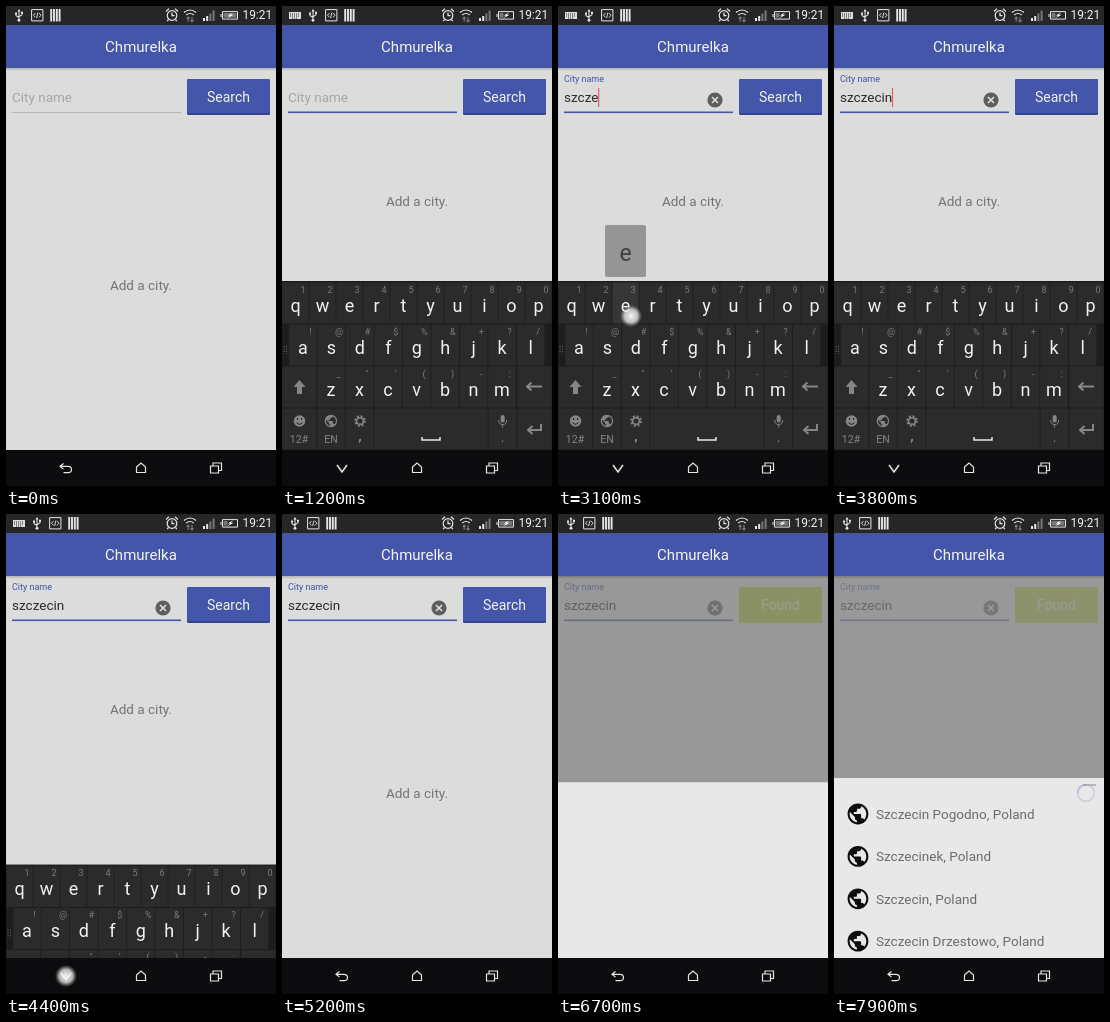
Recreate the animation shown at these times as an HTML page. Size 270 by 480 pixels, loop 8 s.

```html
<!DOCTYPE html>
<html lang="en">
<head>
<meta charset="utf-8">
<title>Weather search</title>
<style>
html, body { margin: 0; width: 100%; height: 100%; overflow: hidden; background: #000; }
svg { display: block; width: 100%; height: 100%; font-family: Roboto, "Open Sans", sans-serif; }
.mid { text-anchor: middle; }
.line { fill: none; stroke: #e6e6e6; stroke-width: 1.2; }
</style>
</head>
<body>
<svg viewBox="0 0 270 480" xmlns="http://www.w3.org/2000/svg">
  <defs>
    <path id="globe" d="M12 2C6.48 2 2 6.48 2 12s4.48 10 10 10 10-4.48 10-10S17.52 2 12 2zm-1 17.93c-3.95-.49-7-3.85-7-7.93 0-.62.08-1.21.21-1.79L9 15v1c0 1.1.9 2 2 2v1.93zm6.9-2.54c-.26-.81-1-1.39-1.9-1.39h-1v-3c0-.55-.45-1-1-1H8v-2h2c.55 0 1-.45 1-1V7h2c1.1 0 2-.9 2-2v-.41c2.93 1.19 5 4.06 5 7.41 0 2.08-.8 3.97-2.1 5.39z"/>
    <linearGradient id="shade" x1="0" y1="0" x2="0" y2="1">
      <stop offset="0" stop-color="#000" stop-opacity=".2"/>
      <stop offset="1" stop-color="#000" stop-opacity="0"/>
    </linearGradient>
    <radialGradient id="glow">
      <stop offset="0" stop-color="#fff" stop-opacity=".95"/>
      <stop offset=".6" stop-color="#eee" stop-opacity=".75"/>
      <stop offset=".8" stop-color="#ddd" stop-opacity=".35"/>
      <stop offset="1" stop-color="#ddd" stop-opacity="0"/>
    </radialGradient>
  </defs>

  <rect width="270" height="480" fill="#dcdcdc"/>

  <g id="content">
    <text id="hint" x="6" y="96" font-size="13.5" fill="#a6a6a6">City name</text>
    <text id="label" x="6" y="75.5" font-size="9" fill="#3f51a5">City name</text>
    <text x="6" y="96" font-size="13.5" fill="#2b2b2b" xml:space="preserve"><tspan id="typed"></tspan><tspan id="fresh" fill-opacity=".45"></tspan></text>
    <rect id="oldCaret" y="82" width="1.2" height="19" fill="#e85a70"/>
    <rect id="caret" y="82" width="1.2" height="19" fill="#e85a70"/>
    <rect id="rule" x="6" width="169"/>
    <g id="clear">
      <circle cx="157" cy="94" r="7.6" fill="#5e5e5e"/>
      <path d="M154 91l6 6m0-6l-6 6" stroke="#e4e4e4" stroke-width="1.5"/>
    </g>
    <text id="empty" class="mid" x="135" font-size="13.5" fill="#747474">Add a city.</text>
    <g id="search">
      <rect x="181" y="73" width="83" height="36" rx="1.5" fill="#34448f"/>
      <rect id="face" x="181" y="73" width="83" height="34" rx="1.5" fill="#4356aa"/>
      <text class="mid" x="222.5" y="96" font-size="14" fill="#f2f2f6">Search</text>
    </g>
    <g id="found">
      <rect x="181" y="73" width="83" height="36" rx="1" fill="#b2c63a"/>
      <text class="mid" x="222.5" y="96" font-size="14" fill="#eaf0cc">Found</text>
    </g>
  </g>

  <rect y="62" width="270" height="3" fill="url(#shade)"/>
  <rect id="dim" y="62" width="270" height="382"/>

  <g id="sheet">
    <rect y="264" width="270" height="182" fill="#e8e8e8"/>
    <g id="list"></g>
    <g id="spinner" fill="none">
      <circle cx="252" cy="279" r="8.3" stroke="#cbcbe0" stroke-width="1.6"/>
      <path id="arc" d="M252 270.7a8.3 8.3 0 0 1 8.3 8.3" stroke="#b4b8de" stroke-width="1.6"/>
      <path d="M249 271h13" stroke="#8a8a8a"/>
    </g>
  </g>

  <rect y="19" width="270" height="43" fill="#4356aa"/>
  <text class="mid" x="135" y="46" font-size="15" fill="#f4f4f8">Chmurelka</text>

  <rect width="270" height="19" fill="#262626"/>
  <g id="kbIcon" fill="#ddd">
    <path d="M7 6h12v7H7z"/>
    <path d="M8 8h10M8 10h10M10 12h6" stroke="#222" stroke-width="1" stroke-dasharray="1 1"/>
  </g>
  <g id="notes">
    <g transform="translate(13 9) scale(.85) translate(-13 -9)">
      <path class="line" d="M13 4v11M9.500 7.500v2.300l3.500 2.200M16.500 6.500v2.300l-3.500 2.200"/>
      <path d="M13 1.800l1.800 3h-3.600zM8.300 6h2.400v2.400H8.300zM15.300 5.200h2.400v2.400h-2.400z" fill="#e6e6e6"/>
      <circle cx="13" cy="15.300" r="1.700" fill="#e6e6e6"/>
    </g>
    <path class="line" d="M25.600 3.600h11.300v11.300H25.600z" style="stroke-width:1"/>
    <path class="line" d="M29.500 7l-2 2.200 2 2.200M33 7l2 2.200-2 2.200M31.900 6.500l-1.300 5.500" style="stroke-width:.9"/>
    <path d="M45.200 3v12.500M48 3v12.500M50.800 3v12.500M53.600 3v12.500" stroke="#e6e6e6" stroke-width="1.900"/>
  </g>
  <g class="line">
    <circle cx="166" cy="9.500" r="4.800"/>
    <path d="M166 6.500v3.200h2.500M160 5.500l3-2.700M172 5.500l-3-2.700M162.500 13.500l-1.300 1.500M169.500 13.500l1.300 1.500"/>
    <path d="M178 6.500q6-5 12 0M180.200 9q3.800-3 7.600 0"/>
  </g>
  <path id="arrows" d="M182.200 16v-5m-1.500 1.800l1.500-1.800 1.500 1.800M186 11v5m-1.500-1.800l1.500 1.800 1.500-1.800" fill="none" stroke="#eee" stroke-width="1.200"/>
  <path d="M197 12h2v3h-2zM200.200 10h2v5h-2z" fill="#e6e6e6"/>
  <path d="M203.400 7.500h2V15h-2zM206.600 4.500h2V15h-2z" fill="#777"/>
  <path class="line" d="M216.500 5.600h15v7.500h-15zM215 8v3" style="stroke-width:1"/>
  <rect id="charge" y="7" height="4.700" fill="#777"/>
  <path d="M227.500 6.300l-6 3.300h2.700l-3 2.800 6.300-3.600h-2.800z" fill="#fff"/>
  <text x="236.500" y="13.300" font-size="11.900" fill="#f2f2f2">19:21</text>

  <g id="board"></g>
  <g id="popup">
    <rect width="41" height="52" rx="2" fill="#858585" opacity=".82"/>
    <text id="popChar" class="mid" x="20.500" y="35.500" font-size="23" fill="#404040"></text>
  </g>

  <rect y="444" width="270" height="36" fill="#0c0b0e"/>
  <path id="back" class="line" d="M57.500 457.500l-3.500 2.800 3.500 2.800M54.500 460.300h7.500q3.500 0 3.500 3.200t-3.500 3.200h-4.500"/>
  <path id="down" class="line" d="M55 459l5 7 5-7" style="stroke-width:1.500"/>
  <path class="line" d="M130.500 466.500v-5.500l4.500-4 4.500 4v5.500z"/>
  <path class="line" d="M204.500 460h8v7h-8zM207 459.500v-2.500h8.500v7.500H213"/>
  <circle id="touch" r="11" fill="url(#glow)"/>
</svg>
<script>
const LOOP = 8000, STEP = 100;
const $ = id => document.getElementById(id);
const set = (id, attrs) => { for (const k in attrs) $(id).setAttribute(k, attrs[k]); };
const show = (id, on) => set(id, { opacity: on ? 1 : 0 });
const ramp = (t, a, b) => Math.min(1, Math.max(0, (t - a) / (b - a)));
const easeOut = p => 1 - (1 - p) ** 3;
const shift = (id, x, y) => set(id, { transform: `translate(${x} ${y})` });

// Keyboard
const keys = {};
const text = (x, y, size, fill, s) =>
  `<text class="mid" x="${x}" y="${y}" font-size="${size}" fill="${fill}">${s}</text>`;
const keyRect = (x, y, w, id = "") =>
  `<rect ${id && `id="key-${id}"`} x="${x + .4}" y="${y + .5}" width="${w - .8}" height="41" fill="#2b2b2b"/>`;

function letterRow(chars, subs, x0, pitch, y) {
  return [...chars].map((c, i) => {
    const cx = x0 + pitch * i;
    keys[c] = { x: cx, y };
    const sub = subs[i] === "&" ? "&amp;" : subs[i];
    return keyRect(cx - pitch / 2, y, pitch, c) +
      text(cx, y + 29.5, 18, "#f2f2f2", c) + text(cx + 7.5, y + 10.5, 9, "#7c7c7c", sub);
  }).join("");
}

function buildBoard() {
  const g = "#858585";
  $("board").innerHTML =
    `<rect y="275" width="270" height="170" fill="#1d1d1d"/>` +
    letterRow("qwertyuiop", "1234567890", 13.5, 27, 276) +
    letterRow("asdfghjkl", "!@#$%&+?/", 21, 28.45, 318) +
    letterRow("zxcvbnm", "_\"'()-:", 49, 28.5, 360) +
    keyRect(0, 360, 34.7) + keyRect(234.8, 360, 35.2) +
    keyRect(0, 402, 34.7) + keyRect(34.7, 402, 28.5) + keyRect(63.2, 402, 28.5) +
    keyRect(91.7, 402, 114.5) + keyRect(206.2, 402, 28.6) + keyRect(234.8, 402, 35.2) +
    `<path d="M2 340v8M4.500 340v8" stroke="#666" stroke-dasharray="1 1.5"/>
     <path d="M17.500 374l6 7h-3.500v7h-5v-7h-3.500z" fill="${g}"/>
     <path d="M260 380.500h-15m4.500-4l-4.500 4 4.500 4M259 418v6h-13m4.500-4l-4.500 4 4.500 4" fill="none" stroke="${g}" stroke-width="2"/>
     <circle cx="17.500" cy="415" r="5.800" fill="${g}"/>
     <path d="M14.500 416.500q3 3.500 6 0M15.500 412v2M19.500 412v2" fill="none" stroke="#222"/>
     <use href="#globe" fill="${g}" transform="translate(41.500 407.500) scale(.62)"/>
     <circle cx="78" cy="415" r="4.700" fill="none" stroke="${g}" stroke-width="2.200" stroke-dasharray="2 1.690"/>
     <circle cx="78" cy="415" r="3.300" fill="none" stroke="${g}" stroke-width="1.500"/>
     <path d="M140 431v3h18v-3" fill="none" stroke="#e8e8e8" stroke-width="1.500"/>
     <rect x="218.700" y="409" width="4" height="7.500" rx="2" fill="${g}"/>
     <path d="M216.700 414q0 4.500 4 4.500t4-4.500M220.700 418.500v3" fill="none" stroke="${g}"/>` +
    text(17, 437, 10.5, g, "12#") + text(49, 437, 10.5, g, "EN") +
    text(78, 435, 15, "#aaa", ",") + text(220.7, 436, 14, g, ".");
}

function buildList() {
  const places = ["Szczecin Pogodno", "Szczecinek", "Szczecin", "Szczecin Drzestowo"];
  $("list").innerHTML = places.map((p, i) => {
    const y = 300 + 42.4 * i;
    return `<use href="#globe" fill="#0c0c0c" transform="translate(11.500 ${y - 12.5}) scale(1.040)"/>` +
      `<text x="42" y="${y + 5}" font-size="13.5" fill="#6c6c6c">${p}, Poland</text>`;
  }).join("");
}

const word = "szczecin";
const pressAt = [1600, 2300, 2500, 2800, 3000, 3200, 3300, 3500];
const blinkFrom = [700, ...pressAt, 3700, 5750];
const taps = [[200, 500, 70, 93], [4200, 4600, 60, 462], [5300, 5600, 224, 96]];
const ink = document.createElement("canvas").getContext("2d");
const caretX = s => { ink.font = "13.5px Roboto, 'Open Sans', sans-serif"; return 6 + ink.measureText(s).width; };

function drawField(t) {
  const n = pressAt.filter(p => p <= t).length;
  const last = pressAt[n - 1];
  const isNew = n > 0 && t - last < STEP;
  const focus = t >= 400;
  $("typed").textContent = word.slice(0, isNew ? n - 1 : n);
  $("fresh").textContent = isNew ? word[n - 1] : "";
  show("hint", !n);
  show("label", n);
  show("clear", n);
  set("rule", focus
    ? { y: 105.5, height: 1.6, fill: "#4356aa" }
    : { y: 106, height: 1, fill: "#b4b4b4" });

  const start = blinkFrom.filter(b => b <= t).pop();
  const on = t < 6500 && start !== undefined && (t - start) % 1000 < 500;
  set("caret", { x: caretX(word.slice(0, n)) - .3, opacity: on ? (isNew ? .4 : 1) : 0 });
  set("oldCaret", { x: caretX(word.slice(0, Math.max(0, n - 1))) - .3, opacity: isNew ? .6 : 0 });
}

function drawKeys(t) {
  for (const c of new Set(word)) {
    const held = pressAt.some((p, i) => word[i] === c && t >= p && t <= p + 200);
    set("key-" + c, { fill: held ? "#363636" : "#2b2b2b" });
  }
  const i = pressAt.findLastIndex(p => t >= p && t < p + 200);
  const tap = taps.find(([a, b]) => t >= a && t < b);
  show("popup", i >= 0);
  show("touch", i >= 0 || tap);
  if (i >= 0) {
    const k = keys[word[i]];
    shift("popup", k.x - 20.5, k.y - 57);
    $("popChar").textContent = word[i];
    set("touch", { cx: k.x + 5.5, cy: k.y + 34 });
  } else if (tap) {
    set("touch", { cx: tap[2], cy: tap[3], opacity: t >= tap[1] - STEP ? .5 : 1 });
  }
}

function draw(t) {
  const up = easeOut(ramp(t, 400, 900)) - ramp(t, 4200, 4500) ** 2;
  const open = t >= 700 && t < 4600;
  shift("board", 0, 170 * (1 - up));
  set("empty", { y: open ? 200 : 284.3 });
  shift("notes", open ? 18 : 0, 0);
  show("kbIcon", open);
  show("down", open);
  show("back", !open);
  set("arrows", { opacity: t >= 6000 && t < 6500 ? 1 : .4 });
  set("charge", { x: 217.5, width: open ? 4 : 13 });

  drawField(t);
  drawKeys(t);

  const done = ramp(t, 5500, 5700);
  set("face", { fill: t >= 5300 && t < 5500 ? "#3a4b98" : "#4356aa" });
  set("search", { opacity: 1 - done });
  set("found", { opacity: done });

  set("dim", { opacity: .31 * ramp(t, 6000, 6390) });
  set("content", { opacity: 1 - .62 * ramp(t, 6000, 6800) });
  shift("sheet", 0, 182 * (1 - easeOut(ramp(t, 6200, 6900))));
  set("list", { opacity: ramp(t, 6700, 7200) });
  show("spinner", t >= 6900);
  set("arc", { transform: `rotate(${(t - 7900) * .36 - 90} 252 279)` });
}

buildBoard();
buildList();
function tick(now) {
  draw(Math.floor(now % LOOP / STEP) * STEP);
  requestAnimationFrame(tick);
}
draw(0);
requestAnimationFrame(tick);
</script>
</body>
</html>
```
